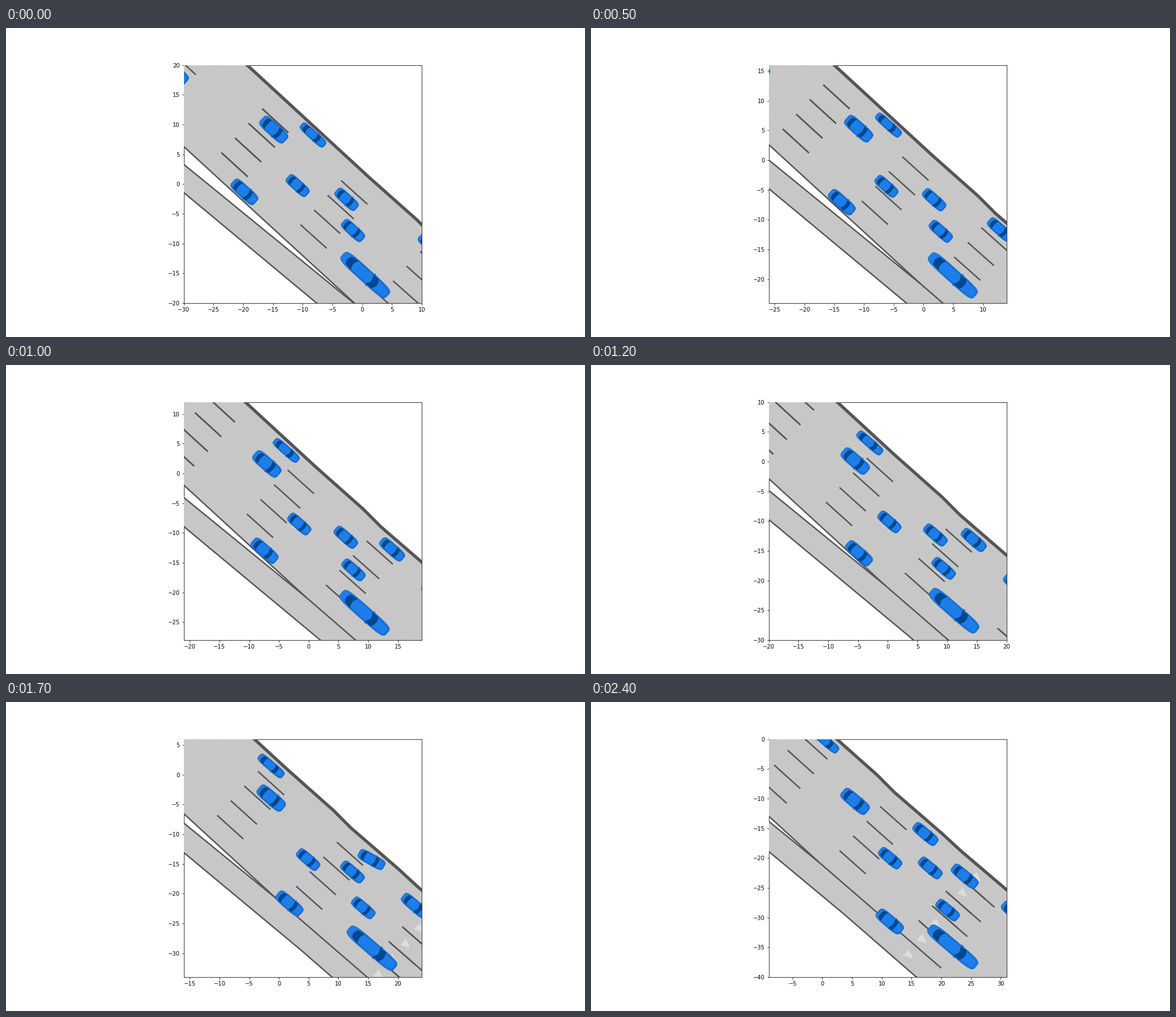
A matplotlib script that plays this animation: 1025 px wide and 547 px high, repeating every 2.5 s.

```python
import numpy as np
import matplotlib.pyplot as plt
from matplotlib.animation import FuncAnimation
from matplotlib.patches import Polygon
from matplotlib.ticker import MultipleLocator

plt.rcParams["font.family"] = "DejaVu Sans"
plt.rcParams["font.size"] = 10

FRAMES = 25
STEP_MS = 100
LAST = FRAMES - 1
HALF_VIEW = 20

ROAD, LINE, ARROW = "#c7c7c7", "#555555", "#dddddd"
BODY, EDGE, GLASS = "#1d7eea", "#0f5cb5", "#00478f"

fig = plt.figure(figsize=(1025 / 72, 547 / 72), dpi=72)
ax = fig.add_subplot()
ax.set_aspect("equal")
ax.xaxis.set_major_locator(MultipleLocator(5))
ax.yaxis.set_major_locator(MultipleLocator(5))


def shape(points, face, edge="none", width=0, z=10):
    return ax.add_patch(Polygon(points, fc=face, ec=edge, lw=width, zorder=z))


def stroke(points, width=2.5):
    x, y = np.transpose(points)
    ax.plot(x, y, color=LINE, lw=width, solid_capstyle="butt", zorder=11)


# ---- road -------------------------------------------------------------
LANE_SHIFT = np.array([-2.28, -2.47])
DASH, PERIOD = 4.42, 13.28


def divider(i, x0, x1):
    """Part of the i-th divider; all are shifted copies of one soft curve."""
    x = np.linspace(x0, x1, 12)
    y = -2.61 - 0.9005 * x + 0.00049 * x ** 2
    return np.column_stack([x, y]) + i * LANE_SHIFT


barrier = [(-34, 33.5), (1.25, 1.04), (9.2, -6.02), (12.1, -8.93),
           (20.1, -15.85), (23.3, -18.8), (40, -33)]
merge, lane_end, far = (-0.4, -20.85), (20, -38.5), (30, -47)
main_edge = [(-36, 11.8), merge]
ramp_edge = [(-36, 8.2), merge]
ramp_outer = [(-36, 3.55), (3.5, -29.3), (22, -45.4)]

lines = [barrier] + [divider(i, -40, 40) for i in range(4)]
lines.append(main_edge + [lane_end, far])
pairs = list(zip(lines, lines[1:]))
pairs.append((ramp_edge + [lane_end, far], ramp_outer))
for upper, lower in pairs:
    shape(np.vstack([upper, lower[::-1]]), ROAD)

stroke(barrier, 5.5)
for edge in (main_edge, ramp_edge, [merge, lane_end], ramp_outer):
    stroke(edge)
for i in range(4):
    for j in range(-1, 3):
        x = -3.55 + (j - 1) * PERIOD + PERIOD
        stroke(divider(i, x - PERIOD * 0, x + DASH))
    # A new road section cuts the last dash short and starts another.
    stroke(divider(i, 23.31, 24.35))
    stroke(divider(i, 24.45, 28.95))
for i in range(4):
    x = -3.55 - PERIOD
    stroke(divider(i, x, x + DASH))
    stroke(divider(i, x - PERIOD, x - PERIOD + DASH))

# Direction arrows, one per lane, where the new section begins
ahead = np.array([np.cos(np.radians(-41)), np.sin(np.radians(-41))])
side = np.array([-ahead[1], ahead[0]])
for i in range(6):
    base = np.array([25.43 - 2.27 * i, -22.87 - 2.6 * i])
    shape([base + 0.73 * side, base - 0.73 * side, base + 1.6 * ahead],
          ARROW, z=12)


# ---- vehicles ---------------------------------------------------------
def outline(power=4.6):
    t = np.linspace(0, 2 * np.pi, 49)
    c, s = np.cos(t), np.sin(t)
    curve = [np.sign(v) * np.abs(v) ** (2 / power) / 2 for v in (c, s)]
    return np.column_stack(curve)


def band(x0, x1, h0, h1, bulge=0.0):
    """Strip across the car; both ends bow by the same amount."""
    t = np.linspace(-1, 1, 9)
    bow = bulge * (1 - t ** 2)
    back = np.column_stack([x0 + bow, h0 * t])
    front = np.column_stack([x1 + bow, h1 * t])
    return np.vstack([back, front[::-1]])


MIRROR = np.array([(.12, .48), (.1, .54), (.12, .55), (.15, .48)])
PARTS = [
    (MIRROR, GLASS, EDGE),
    (MIRROR * (1, -1), GLASS, EDGE),
    (outline(), BODY, EDGE),
    (band(.22, .46, .43, .3, .02), "none", EDGE),
    (band(-.27, .15, .42, .42), BODY, EDGE),
    (band(-.36, -.24, .35, .41, -.03), GLASS, GLASS),
    (band(.1, .21, .39, .44, .04), GLASS, GLASS),
]


class Car:
    """Drives straight; speed runs smoothly through start, middle and end."""

    def __init__(self, size, start, angle, speeds, swerve=0):
        self.size, self.start = np.array(size), np.array(start)
        self.swerve = swerve
        a = np.radians(angle)
        self.course = np.array([np.cos(a), np.sin(a)])
        v0, vm, v1 = speeds
        self.speed = v0, 4 * vm - 3 * v0 - v1, 2 * (v0 + v1 - 2 * vm)
        self.patches = [shape(p, f, e, 0.8, 20) for p, f, e in PARTS]

    def at(self, k):
        u = k / LAST
        a, b, c = self.speed
        way = LAST * u * (a + b * u / 2 + c * u * u / 3)
        return self.start + way * self.course

    def place(self, k):
        bump = np.interp(k, (15, 17, 20), (0, 1, 0))
        a = np.radians(-42.3 + 2.3 * k / LAST + self.swerve * bump)
        turn = np.array([(np.cos(a), np.sin(a)), (-np.sin(a), np.cos(a))])
        for patch, part in zip(self.patches, PARTS):
            patch.set_xy(part[0] * self.size @ turn + self.at(k))


lead = Car((4.4, 1.82), (-10.85, -.27), -41.6, (1.24, 1.24, 1.24))
cars = [
    lead,
    Car((4.9, 2.1), (-31.4, 18.8), -40.5, (.89, .89, .89)),
    Car((5.35, 2.2), (-14.87, 9.14), -43.9, (1.148, 1.104, 1.509)),
    Car((5.25, 1.5), (-8.27, 8.24), -44.2, (.708, .514, .319)),
    Car((4.5, 1.82), (-2.62, -2.57), -42.6, (1.191, 1.196, 1.079)),
    Car((4.45, 1.82), (-1.55, -7.81), -42.8, (1.2, 1.286, 1.36)),
    Car((10.2, 2.25), (.51, -15.3), -42.5, (1.2, 1.21, 1.224)),
    Car((5.15, 2.05), (-19.81, -1.31), -43.3, (1.645, 1.784, 1.923)),
    Car((4.8, 1.85), (11.5, -10.33), -44, (.42, .302, .4), swerve=11),
    Car((5.15, 1.9), (19.73, -19.07), -43.5, (.055, .319, .122)),
    Car((4.9, 1.9), (30.2, -27.6), -38, (.11, .11, .11)),
]


def update(k):
    for car in cars:
        car.place(k)
    # The view follows the lead car in whole units.
    cx, cy = (int(v) for v in lead.at(k))
    ax.set_xlim(cx - HALF_VIEW, cx + HALF_VIEW)
    ax.set_ylim(cy - HALF_VIEW, cy + HALF_VIEW)
    return []


anim = FuncAnimation(fig, update, frames=FRAMES, interval=STEP_MS,
                     init_func=lambda: update(0), repeat=True,
                     repeat_delay=0, blit=False)
plt.show()
```
